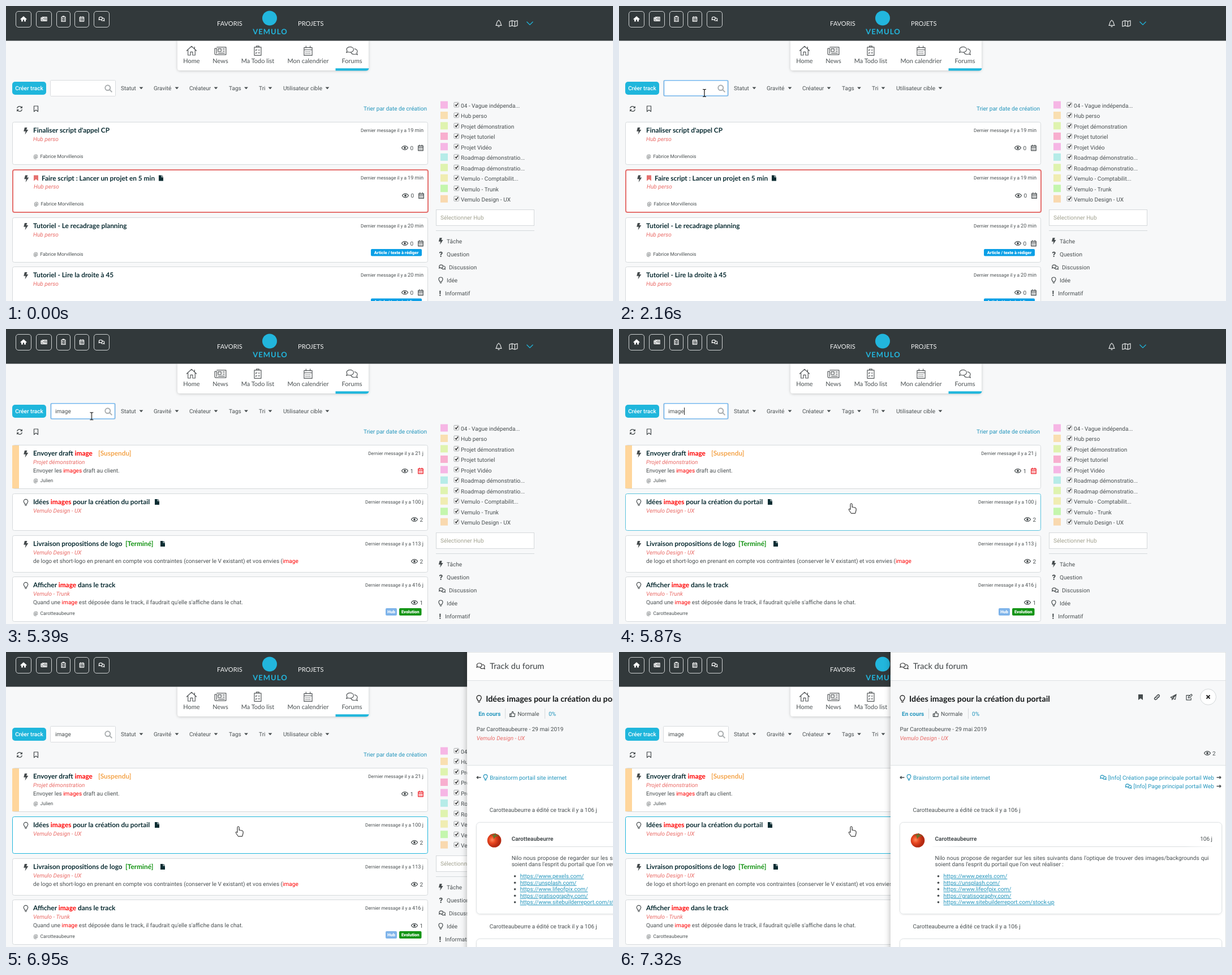
Write an HTML page that moves like this. It is 1073 by 522 pixels and loops after 8 s.

```html
<!DOCTYPE html>
<html lang="fr">
<head>
<meta charset="utf-8">
<title>Forum</title>
<style>
html, body { margin: 0; width: 100%; height: 100%; overflow: hidden; background: #f7f8f9; }
svg { display: block; width: 100vw; height: 100vh; }
text { font: 10.07px Roboto, sans-serif; fill: #4a5052; text-rendering: geometricPrecision; white-space: pre; }
.h { font: 700 11.85px Lato, sans-serif; fill: #0b2d33; }
.nav { font: 11px Lato, sans-serif; text-anchor: middle; }
.menu { font: 11.1px Lato, sans-serif; fill: #f2f3f3; }
.brand { font: 700 13px Lato, sans-serif; letter-spacing: 1px; fill: #22b6dd; text-anchor: middle; }
.head { font: 14.6px Lato, sans-serif; fill: #3c4143; }
.topic { font: 700 14.3px Lato, sans-serif; fill: #151819; }
.sub { font-style: italic; fill: #ea6c68; }
.small { font-size: 8.5px; }
.at { font-size: 9px; }
.date { font-size: 8.3px; text-anchor: end; }
.date tspan { font-size: 9.2px; }
.end { text-anchor: end; }
.link { fill: #2496bd; }
.url { fill: #2496bd; text-decoration: underline; }
.bold { font-weight: 700; }
.tag { font: 900 7.5px Roboto, sans-serif; fill: #fff; text-anchor: middle; }
.create { font-weight: 500; fill: #fff; text-anchor: middle; }
.hint { fill: #a3a391; }
.sign { font: 900 13px Roboto, sans-serif; }
.wait { fill: #f4a54c; }
.done { fill: #139313; }
.hit { fill: #f00; }
.ico { fill: none; stroke: currentColor; stroke-width: 1.2; stroke-linejoin: round; }
.ico * { vector-effect: non-scaling-stroke; }
.thick { stroke-width: 1.9; }
.solid { fill: currentColor; stroke: none; }
.card { fill: #fff; stroke: #d6dadc; }
p { margin: 0; font: 10.07px/11.6px Roboto, sans-serif; color: #4a5052; text-align: justify; text-rendering: geometricPrecision; }
</style>
</head>
<body>
<script>
const CYAN = '#1fb6dc', GREY = '#d6dadc', CORAL = '#e5706e', INK = '#454b4d', LINK = '#2496bd', TAG = '#0a9fe6';
let css = '';

// Keyframes over the 8 s loop; stops are [ms, value].
function animate(name, prop, stops, ease = 'linear') {
  const all = [[0, stops[0][1]], ...stops, [8000, stops[stops.length - 1][1]]];
  css += `@keyframes ${name}{${all.map(([t, v]) => `${t / 80}%{${prop}:${v}}`).join('')}}
    .${name}{animation:${name} 8s ${ease} infinite}`;
}
function show(name, ...spans) {
  const stops = [[0, 'hidden']];
  for (const [from, to] of spans) stops.push([from, 'visible'], [to, 'hidden']);
  animate(name, 'visibility', stops, 'step-end');
}

const ICONS = {
  bolt: '<path class="solid" d="M-2-6H2.4L1-2H4.3L-1.4 6.5-.3.7H-3.8Z"/>',
  bulb: '<path d="M-1.6 3.2C-1.6 1-3.7.6-3.7-1.9a3.7 3.7 0 0 1 7.4 0C3.7.6 1.6 1 1.6 3.2ZM-1.6 5.2H1.6"/>',
  eye: '<path d="M-5.5 0C-3-4.4 3-4.4 5.5 0 3 4.4-3 4.4-5.5 0Z"/><circle class="solid" r="1.9"/>',
  cal: '<path d="M-4.3-3.6H4.3V4.8H-4.3ZM-4.3-1.2H4.3M-2.2-5.5V-3M2.2-5.5V-3"/><path stroke-dasharray="1.4 1" d="M-2.8 1H3M-2.8 3H3"/>',
  doc: '<path class="solid" d="M-4-5H.6V-1.6H4V5H-4ZM1.4-5 4-2.4H1.4Z"/>',
  mark: '<path d="M-3.5-5H3.5V4.8L0 2-3.5 4.8Z"/>',
  markFull: '<path class="solid" d="M-4-5H4V5L0 2-4 5Z"/>',
  chat: '<path d="M-2-4.2c2.2 0 3.7 1.2 3.7 2.8S.2 1.4-2 1.4c-.8 0-1.4-.1-2-.4L-5.8 1.8-5-.1C-6.4-2.3-4.6-4.2-2-4.2ZM2.6-2.3C5.5-1.8 6.4.4 5 2.2L5.8 4 3.9 3.2C1.8 4-.4 3.3-1 1.6"/>',
  home: '<path d="M-6 0 0-5.5 6 0M-4.2-1.2V5H-1.3V1.2H1.3V5H4.2V-1.2M3.6-5V-2.4"/>',
  homeFull: '<path class="solid" d="M0-5.8 6.8.4 5.6 1.4 4.6.5V5.4H1.4V1.6H-1.4V5.4H-4.6V.5L-5.6 1.4-6.8.4Z"/>',
  news: '<path d="M-4-4H6V4H-5Q-6 4-6 3V-2.6H-4V3M-2.4-2.3H.8V.6H-2.4ZM2.3-2H4.6M2.3.2H4.6M-2.4 2.3H4.6"/>',
  list: '<path d="M-4-4.4H4V5.2H-4ZM-1.6-4.4V-5.8H1.6V-4.4M-2.6-1.2-2-.5-1-1.9M.3-1H2.6M-2.6 2.2-2 2.9-1 1.5M.3 2.3H2.6"/>',
  search: '<g class="thick"><circle cx="-1.2" cy="-1.2" r="4.5"/><path d="M2.2 2.2 6.4 6.4"/></g>',
  sync: '<path d="M-4.3-.8A4.4 4.4 0 0 1 3.6-2.6M4.3.8A4.4 4.4 0 0 1-3.6 2.6"/><path class="solid" d="M4.9-5V-1H.9ZM-4.9 5V1H-.9Z"/>',
  bell: '<path d="M-5 3.4C-3 1.5-4-5 0-5S3 1.5 5 3.4ZM-1.4 4.8Q0 6.6 1.4 4.8M0-5V-6.4"/>',
  map: '<path d="M-7-3.6-2.4-5.2 2.4-3.6 7-5.2V3.6L2.4 5.2-2.4 3.6-7 5.2ZM-2.4-5.2V3.6M2.4-3.6V5.2"/>',
  thumb: '<path d="M-4.6-.6H-2.4V4.4H-4.6ZM-2.4 0C-.6-1.4-.6-3.4-.1-4.6 1.8-4.8 2-2.8 1.2-1H4.6L3.8 4.4H-2.4"/>',
  chain: '<path stroke-width="1.5" d="M-1 1.3C-2.4 0-2-1 1-3.7 3.4-5.4 5.4-3.2 3.8-1L2.5.4M1-1.3C2.4 0 2 1-1 3.7-3.4 5.4-5.4 3.2-3.8 1L-2.5-.4"/>',
  plane: '<path d="M5-5 3.2 4-.8 2.2-2.4 4.6V1.4L-5 .2ZM-2.4 1.4 5-5-.8 2.2"/>',
  edit: '<path d="M1-3.4H-5V4.8H3.2V1M-1.6 1.4-1.3-.8 3.6-5.4 5.3-3.6.6 1.1Z"/>',
  left: '<path stroke-width="1.5" d="M4 0H-3M-1-2.3-3.4 0-1 2.3"/>',
  right: '<path stroke-width="1.5" d="M-4 0H3M1-2.3 3.4 0 1 2.3"/>',
  down: '<path d="M-5.5-2.7 0 2.7 5.5-2.7"/>',
  cross: '<path class="thick" d="M-3-3 3 3M3-3-3 3"/>'
};
const icon = (name, x, y, color = INK, k = 1) =>
  `<g class="ico" color="${color}" transform="translate(${x} ${y}) scale(${k})">${ICONS[name]}</g>`;
const text = (x, y, s, cls = '') => `<text x="${x}" y="${y}" class="${cls}">${s}</text>`;
const span = (cls, s) => `<tspan class="${cls}">${s}</tspan>`;
const rect = (x, y, w, h, attr) => `<rect x="${x}" y="${y}" width="${w}" height="${h}" ${attr}/>`;
const hit = s => s.replace(/\*(\w+)/g, span('hit', '$1'));
const tag = (x, y, w, h, color, s) =>
  rect(x, y, w, h, `rx="2" fill="${color}"`) + text(x + w / 2, y + h / 2 + 2.6, s, 'tag');
const doc = (x, y) => icon('doc', x, y, '#0b2d33');

function card(y, h, o) {
  const x = o.dx || 0, ex = o.cal ? 705 + x : 722;
  return rect(11.5 + x / 2, y + .5, 734, h - 1, `rx="3" class="card ${o.edge || ''}" stroke-width="${x + 1}"`) +
    (o.stripe ? rect(11, y + 1, 12, h - 2, `fill="${o.stripe}"`) : '') +
    icon(o.icon || 'bolt', 35 + x, y + 16) +
    text(o.tx || 48, y + 19, hit(o.title), 'h') +
    text(48 + x, y + 33.5, o.hub, 'sub') +
    (o.line ? text(48, y + 49, hit(o.line)) : '') +
    (o.who ? text(48.5 + x, y + o.whoY, '@', 'at') + text(60.5 + x, y + o.whoY, o.who, 'small') : '') +
    text(738, y + 17.5, `Dernier message il y a <tspan>${o.date}</tspan>`, 'date') +
    icon('eye', ex, y + 46) + text(ex + 9.5, y + 49.6, o.views) +
    (o.cal ? icon('cal', 733 + x, y + 46, o.cal) : '') + (o.extra || '');
}

const FAN = 'Carotteaubeurre';
const mine = { hub: 'Hub perso', who: 'Fabrice Morvillenois', whoY: 63.5, cal: INK, views: 0 };

const listA =
  card(205, 76, { ...mine, edge: 'edgeA1', title: "Finaliser script d'appel CP", date: '19 min' }) +
  card(289.5, 76, { ...mine, dx: 1, edge: 'edgeA2', tx: 63, title: 'Faire script : Lancer un projet en 5 min',
    date: '19 min', extra: icon('markFull', 53, 304.5, CORAL) + doc(274, 304.5) }) +
  card(374, 80, { ...mine, edge: 'edgeA3', whoY: 67.5, title: 'Tutoriel - Le recadrage planning', date: '20 min',
    extra: tag(645, 430, 90, 12.5, TAG, 'Article / texte à rédiger') }) +
  card(461, 80, { ...mine, whoY: 67.5, title: 'Tutoriel - Lire la droite à 45', date: '20 min',
    extra: tag(645, 517.5, 90, 12.5, TAG, 'Article / texte à rédiger') });

const listB =
  card(205, 78, { edge: 'edgeB1', stripe: '#ffd69c', title: 'Envoyer draft *image', hub: 'Projet démonstration',
    line: 'Envoyer les *images draft au client.', who: 'Julien', whoY: 65.8, date: '21 j', views: 1, cal: '#ee1c25',
    extra: text(163, 224, span('wait', '[Suspendu]'), 'h') }) +
  card(291, 66, { edge: 'edgeB2', icon: 'bulb', title: 'Idées *images pour la création du portail',
    hub: 'Vemulo Design - UX', date: '100 j', views: 2, extra: doc(267, 306) }) +
  card(365, 66, { title: 'Livraison propositions de logo', hub: 'Vemulo Design - UX', date: '113 j', views: 2,
    line: 'de logo et short-logo en prenant en compte vos contraintes (conserver le V existant) et vos envies (*image',
    extra: text(211, 384, span('done', '[Terminé]'), 'h') + doc(277, 380) }) +
  card(438, 80, { icon: 'bulb', title: 'Afficher *image dans le track', hub: 'Vemulo - Trunk', date: '416 j', views: 1,
    line: "Quand une *image est déposée dans le track, il faudrait qu'elle s'affiche dans le chat.", who: FAN, whoY: 67.8,
    extra: tag(671, 494, 20, 13, '#7fb4ea', 'Hub') + tag(695, 494, 39.5, 13, '#149516', 'Evolution') });

const buttons = [[17, 27, 'homeFull'], [53, 27, 'news'], [89, 24, 'list'], [121, 25, 'cal'], [155, 27, 'chat']];
const header = rect(0, 0, 1073, 61.5, 'fill="#32393b"') +
  buttons.map(([x, w, n]) => rect(x + .5, 9.5, w, 28, 'rx="4.5" fill="none" stroke="#cfd2d3"') +
    icon(n, x + w / 2 + .5, 23, '#fff', .85)).join('') +
  text(373, 34.5, 'FAVORIS', 'menu') + text(516, 34.5, 'PROJETS', 'menu') +
  '<circle cx="466" cy="21.5" r="13" fill="#22b6dd"/>' + text(467, 50, 'VEMULO', 'brand') +
  icon('bell', 871, 31, '#e8eaea') + icon('map', 897, 31, '#e8eaea') + icon('down', 926, 30.5, CYAN);

const tabs = [[328, 'home', 'Home', 1.5], [379, 'news', 'News', 1.65], [445, 'list', 'Ma Todo list', 1.5],
  [534, 'cal', 'Mon calendrier', 1.65], [611.5, 'chat', 'Forums', 1.7]];
const nav = '<path d="M303 61H641V109q0 5-5 5H308q-5 0-5-5Z" fill="#fff" filter="url(#soft)"/>' +
  tabs.map(([x, n, s, k]) => icon(n, x, 79.5, '#55595b', k) + text(x, 101, s, 'nav')).join('') +
  `<path d="M582.5 110.3H641.5Q641 114.5 636 114.5H582.5Z" fill="${CYAN}"/>`;

const filters = [[203, 'Statut', 239], [261, 'Gravité', 302], [324, 'Créateur', 371], [394, 'Tags', 424.5],
  [447, 'Tri', 467], [490, 'Utilisateur cible', 568]];
const typed = [...'image'].map((c, i) => span('key' + i, c)).join('');
const toolbar = rect(11, 134, 60, 23, `rx="5" fill="${CYAN}"`) + text(41, 149, 'Créer track', 'create') +
  rect(78.5, 131.5, 115, 28, 'rx="1" fill="#fff" stroke="#d9dcde"') +
  rect(79.5, 131.7, 113, 27.3, 'rx="2" fill="none" stroke="#78b9ef" stroke-width="1.6" class="focus"') +
  icon('search', 181, 146, '#a9adaf') + text(87, 149.3, typed) +
  '<g class="caretX"><path class="caret" d="M.5 139V152" stroke="#222"/></g>' +
  filters.map(([x, s, a]) => text(x, 148.8, s) + `<path d="M${a - 3.4} 143.6h6.8l-3.4 3.6Z" fill="${INK}"/>`).join('') +
  icon('sync', 24, 182) + icon('mark', 53, 182) + text(744, 185.4, 'Trier par date de création', 'link end');

const hubs = [['04 - Vague indépenda...', '#f6b6e5'], ['Hub perso', '#f9dfb1'], ['Projet démonstration', '#dff3af'],
  ['Projet tutoriel', '#f8afcf'], ['Projet Vidéo', '#f6b6e5'], ['Roadmap démonstratio...', '#b6ece8'],
  ['Roadmap démonstratio...', '#dff3af'], ['Vemulo - Comptabilit...', '#f0edb2'], ['Vemulo - Trunk', '#c4f6ad'],
  ['Vemulo Design - UX', '#f9d9af']];
const kinds = [['bolt', 'Tâche', 779], ['?', 'Question', 779], ['chat', 'Discussion', 783], ['bulb', 'Idée', 779], ['!', 'Informatif', 776]];
const side = hubs.map(([s, c], i) => {
    const y = 168.5 + i * 18.47;
    return rect(768, y, 13, 13, `fill="${c}"`) + rect(792, y + 2, 8.5, 8.5, 'rx="1" fill="#fff" stroke="#a5a8aa"') +
      `<path d="M794 ${y + 6.2}l1.8 2 3.2-4.6" fill="none" stroke="#333" stroke-width="1.6"/>` + text(804, y + 11.3, s);
  }).join('') +
  rect(760.5, 360.5, 173, 28, 'fill="#fff" stroke="#d5d9db"') + text(768, 378.4, 'Sélectionner Hub', 'hint') +
  '<path d="M760 397.5H934" stroke="#d5d9db"/>' +
  kinds.map(([n, s, x], i) => {
    const y = 416 + i * 23.1;
    return (ICONS[n] ? icon(n, n == 'chat' ? 771 : 768.5, y, INK, .95) : text(765.5, y + 4.5, n, 'sign')) + text(x, y + 3.6, s);
  }).join('');

const sites = ['www.pexels.com/', 'unsplash.com/', 'www.lifeofpix.com/', 'gratisography.com/', 'www.sitebuilderreport.com/stock-up'];
const box = (y, h) => rect(496.5, y, 569, h, 'rx="6" fill="#fff" stroke="#dfe3e5" filter="url(#faint)"');
const panel = rect(480, -10, 600, 545, 'fill="#fff" filter="url(#deep)"') +
  rect(480, 0, 593, 50, 'fill="#fdfdfd"') + rect(480, 50, 593, 150, 'fill="#f7f8f9"') +
  '<path d="M480 50.5H1073M480 200.5H1073M480 .5H1073M1072.5 0V522" stroke="#dde1e3"/>' +
  icon('chat', 504, 25, '#333', 1.25) + text(520, 30, 'Track du forum', 'head') +
  icon('bulb', 501, 83, '#111', 1.1) + text(513, 87.8, 'Idées images pour la création du portail', 'topic') +
  icon('markFull', 922, 80) + icon('chain', 951, 80) + icon('plane', 980, 80) + icon('edit', 1008, 80) +
  '<circle cx="1041.5" cy="79.5" r="14" fill="#fff" stroke="#d3d7d9"/>' + icon('cross', 1041.5, 79.5, '#222') +
  text(500, 113.3, 'En cours', 'link bold') + '<path d="M547.5 100V118M617.5 100V118" stroke="#d5d9db"/>' +
  icon('thumb', 560, 110) + text(569, 113.3, 'Normale') + text(624, 113.3, '0%', 'link') +
  text(496.5, 140, `Par ${FAN} - 29 mai 2019`) + text(496.5, 155.5, 'Vemulo Design - UX', 'sub') +
  icon('eye', 1040, 179) + text(1049, 182.6, '2') +
  icon('left', 500.5, 222) + icon('bulb', 512.5, 222, LINK, .9) + text(520, 225.5, 'Brainstorm portail site internet', 'link') +
  icon('chat', 856, 222, LINK, .9) + text(1052, 225.5, '[Info] Création page principale portail Web', 'link end') + icon('right', 1060.5, 222) +
  icon('chat', 900.5, 237.5, LINK, .9) + text(1052, 241, '[Info] Page principal portail Web', 'link end') + icon('right', 1060.5, 237.5) +
  text(519.5, 283, `${FAN} a édité ce track il y a 106 j`) + box(301.5, 162) +
  '<circle cx="528" cy="333.5" r="12.3" fill="url(#fruit)"/><path d="M521 322l6 2 3-4 1 4 6 1-7 2-3 4-1-5Z" fill="#66722c"/>' +
  text(558.5, 334, FAN, 'bold') + text(1049, 334, '106 j', 'end') +
  rect(554, 344, 495, 1, 'fill="url(#fade)"') +
  `<foreignObject x="558.5" y="359.6" width="484" height="30"><p xmlns="http://www.w3.org/1999/xhtml">Nilo nous propose de regarder sur les sites suivants dans l'optique de trouver des images/backgrounds qui soient dans l'esprit du portail que l'on veut réaliser :</p></foreignObject>` +
  sites.map((s, i) => `<circle cx="564.5" cy="${396.8 + i * 11.5}" r="1.8" fill="${INK}"/>` +
    text(573.5, 400.2 + i * 11.5, 'https://' + s, 'url')).join('') +
  text(519.5, 489, `${FAN} a édité ce track il y a 106 j`) + box(507.5, 60);

const cursor = `<g class="move">
  <path class="arrow" d="M0 0V15l3.4-3.2 2.3 5.2 2.3-1-2.3-5H10.5Z" fill="#fff" stroke="#111"/>
  <path class="hand" d="M-2 1.4a1.6 1.6 0 0 1 3.2 0V6.5q1.2-1 2.4.2 1.4-.7 2.3.6 2-.5 2.2 1.4V12L6.7 17.2H-.6L-4.6 11.2q-.8-1.8 1-1.9L-2 10.6Z" fill="#fff" stroke="#111"/>
  <path class="beam" d="M-3-6.5H-1L0-5.5 1-6.5H3M0-5.5V5.5M-3 6.5H-1L0 5.5 1 6.5H3" fill="none" stroke="#111" stroke-width="1.2"/></g>`;

const at = (t, x, y) => [t, `translate(${x}px,${y}px)`];
animate('move', 'transform', [at(530, 935, 524), at(600, 850, 480), at(680, 715, 428), at(760, 575, 365), at(830, 470, 313),
  at(890, 391, 273), at(960, 325, 238), at(1050, 258, 211), at(1160, 212, 187), at(1330, 169, 161), at(1400, 158, 157),
  at(1500, 151, 154), at(5390, 151, 154), at(5450, 172, 169), at(5530, 240, 212), at(5610, 325, 265), at(5690, 384, 296), at(5800, 411, 309)]);
show('arrow', [530, 665], [1080, 1360], [5420, 5520]);
show('hand', [665, 1080], [5520, 8000]);
show('beam', [1360, 5420]);

const keys = [2610, 3100, 3200, 3440, 3560];
keys.forEach((t, i) => show('key' + i, [t, 8000]));
show('caret', [1640, 2160], [2610, 4090], [4610, 5140], [5660, 6160]);
animate('caretX', 'transform', [at(0, 87, 0), ...keys.map((t, i) => at(t, [89, 98, 104, 110, 115][i], 0))], 'step-end');
animate('focus', 'opacity', [[1640, 0], [1760, 1], [6460, 1], [6580, 0]]);

animate('edgeA1', 'stroke', [[890, GREY], [1070, CYAN], [1240, GREY]]);
animate('edgeA2', 'stroke', [[760, CORAL], [850, '#3ba4bd'], [890, '#4a9fb3'], [1130, CORAL]]);
animate('edgeA3', 'stroke', [[650, GREY], [750, '#7ccbe0'], [880, GREY]]);
animate('edgeB1', 'stroke', [[5520, GREY], [5640, '#7ccbe0'], [5850, GREY]]);
animate('edgeB2', 'stroke', [[5670, GREY], [5970, CYAN]]);
show('before', [0, 4110]);
show('after', [4110, 8000]);
css += `@keyframes slide{0%,82.75%{transform:translateX(613px);animation-timing-function:ease-in-out}91.5%,100%{transform:none}}
  .slide{animation:slide 8s infinite}`;

const shadow = (id, dx, dy, blur, a) =>
  `<filter id="${id}" x="-10%" y="-20%" width="120%" height="150%"><feDropShadow dx="${dx}" dy="${dy}" stdDeviation="${blur}" flood-color="#000" flood-opacity="${a}"/></filter>`;
const defs = `<defs>${shadow('soft', 0, 1, 2.5, .2)}${shadow('faint', 0, 1, 1.5, .08)}${shadow('deep', -2, 0, 5, .22)}
  <radialGradient id="fruit" cx=".35" cy=".45"><stop stop-color="#ff8a5c"/><stop offset=".5" stop-color="#e8451f"/><stop offset="1" stop-color="#b52a12"/></radialGradient>
  <linearGradient id="fade"><stop stop-color="#d9dddf" stop-opacity=".2"/><stop offset=".1" stop-color="#d9dddf"/><stop offset=".9" stop-color="#d9dddf"/><stop offset="1" stop-color="#d9dddf" stop-opacity=".2"/></linearGradient></defs>`;

document.body.innerHTML = `<style>${css}</style><svg viewBox="0 0 1073 522" preserveAspectRatio="none">${defs}
  ${nav}${header}${toolbar}<g class="before">${listA}</g><g class="after">${listB}</g>${side}${cursor}
  <g class="slide">${panel}</g></svg>`;
</script>
</body>
</html>
```
